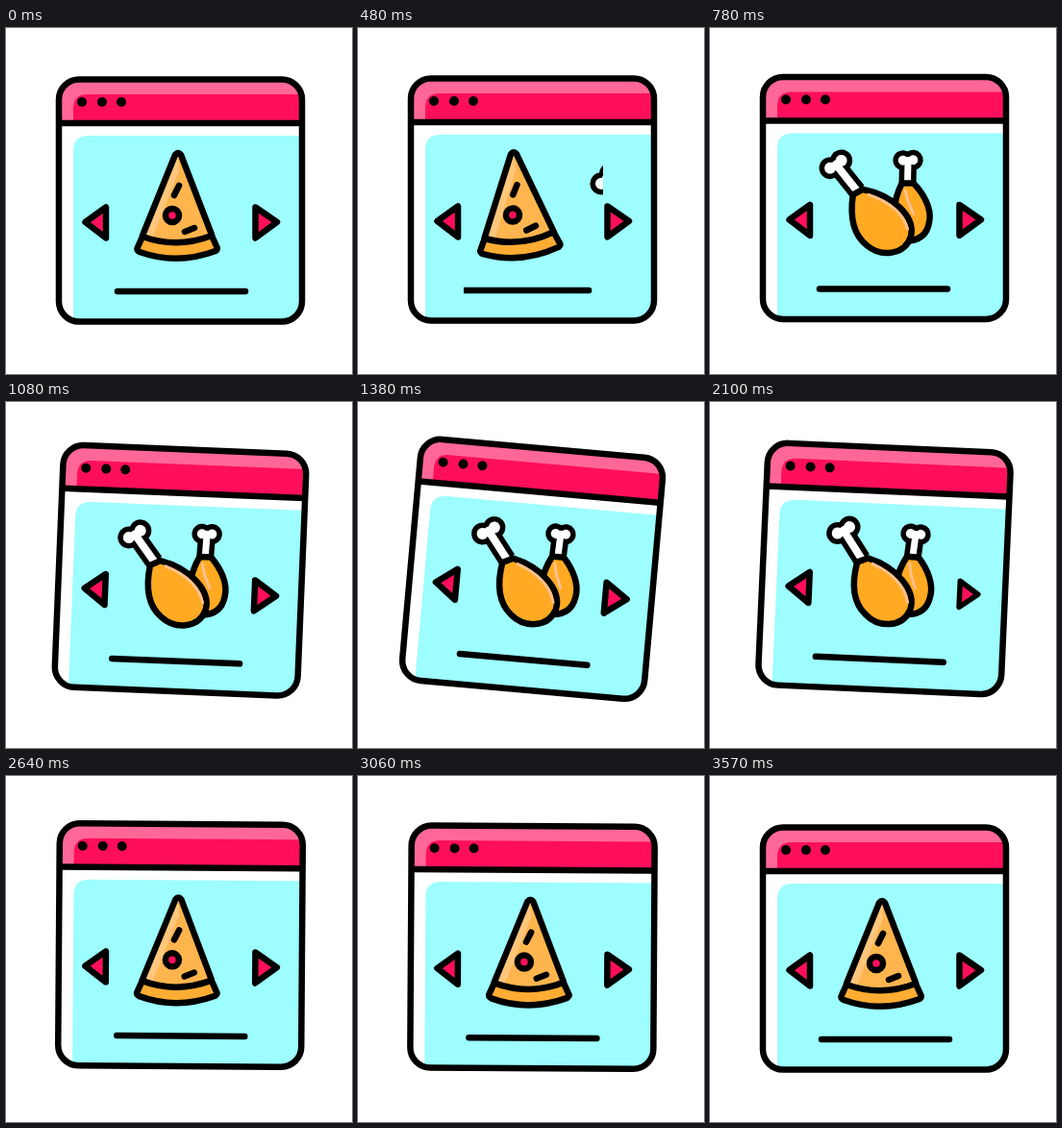
Recreate the animation shown at these times as an HTML page. Size 360 px wide and 360 px high, loop 3.6 s.

```html
<!DOCTYPE html>
<html lang="en">
<head>
<meta charset="utf-8">
<title>Food carousel</title>
<style>
  html, body { margin: 0; width: 100%; height: 100%; overflow: hidden; background: #fff; }
  svg { display: block; width: 100vw; height: 100vh; }
  .ink { stroke: #000; stroke-width: 6.5; stroke-linecap: round; stroke-linejoin: round; }
  .none { fill: none; }
  .red { fill: #ff0f5b; }
  .meat { fill: #ffaa22; }
  .shine { fill: none; stroke: #ffc08c; stroke-width: 3; stroke-linecap: round; }
</style>
</head>
<body>
<svg viewBox="0 0 360 360">
  <defs>
    <clipPath id="frame"><rect x="55" y="53.5" width="253" height="252" rx="21"/></clipPath>
    <clipPath id="view"><rect x="110" y="104" width="145" height="196"/></clipPath>
  </defs>
  <g id="win">
    <g clip-path="url(#frame)">
      <rect x="52" y="50" width="260" height="260" fill="#fff"/>
      <rect x="52" y="50" width="260" height="49" fill="#ff6798"/>
      <path class="red" d="M70 99 V84 Q70 69 85 69 H312 V99 Z"/>
      <path d="M70 310 V128 Q70 112 86 112 H312 V310 Z" fill="#9dfdff"/>
    </g>
    <rect class="ink none" x="55" y="53.5" width="253" height="252" rx="21"/>
    <path class="ink" d="M56 99 H307"/>
    <circle cx="79" cy="77" r="5"/><circle cx="100" cy="77" r="5"/><circle cx="120" cy="77" r="5"/>

    <g clip-path="url(#view)">
      <g id="slideA">
        <path class="ink" d="M116 274 H249"/>
        <g id="pizza">
          <path d="M179 130 L142 217 Q178 230 214 216 Z" fill="#ffb54e"/>
          <path d="M179 130 L142 217 L152 220 L180 148 Z" fill="#ffc67c"/>
          <path class="ink none" d="M142 216 L176 132 Q179 128 182 132 L214 215"/>
          <path class="ink" d="M142 217 Q178 230 214 216 L219 227 Q221 230 218 232 Q178 247 139 233 Q135 231 137 228 Z" fill="#ffac33"/>
          <circle class="ink red" cx="173" cy="195" r="7"/>
          <path class="ink" d="M180 164 L175 174 M186 212 L196 208"/>
        </g>
      </g>
      <g id="slideB">
        <path class="ink" d="M114 274 H247"/>
        <g id="legs">
          <g transform="translate(181.5 180) rotate(4.66) translate(-181 -173)">
            <g id="bone2"></g>
            <path class="ink meat" d="M199 156 L211 155 C222 165 232 180 230 194 C229 208 220 215 205 216 C187 205 192 172 199 156 Z"/>
            <path class="shine" d="M203 163 L206 173 L213 187"/>
            <g id="bone1"></g>
            <path class="ink meat" d="M149 171 C147 195 152 213 167 223 C182 234 207 231 212 210 C215 189 190 169 159 165 Z"/>
            <path class="shine" d="M165 170 Q199 179 208 203"/>
          </g>
        </g>
      </g>
    </g>

    <path class="ink red" d="M82.5 202 L104 186.5 V218.5 Z"/>
    <path class="ink red" id="next" d="M259.5 186.5 L282 202 L259.5 218.5 Z"/>
  </g>
</svg>
<script>
const LOOP = 3600, HALF = LOOP / 2, STEP = 155;
const $ = id => document.getElementById(id);
const put = (id, value) => $(id).setAttribute('transform', value);

// Keys are [time, value] pairs joined by sine easing.
// The window swings out once, then settles like a pendulum while it floats up and down.
const TILT = [[880, 0], [1330, 5.6], [1690, -4.7], [2080, 2.6], [2400, -2.5], [2770, 1.5], [3200, 0]];
const RISE = [[0, 0], [HALF, -6.5], [LOOP, 0]];
const PRESS = [[150, 1], [300, 0.85], [440, 1]];
const LEAVE = [[150, 0], [310, 3], [620, -10]];
const ENTER = [[360, 0], [480, -14], [840, 0]];

function at(keys, t) {
  if (t <= keys[0][0]) return keys[0][1];
  for (let i = 1; i < keys.length; i++) {
    const [t0, a] = keys[i - 1], [t1, b] = keys[i];
    if (t < t1) return a + (b - a) * (1 - Math.cos(Math.PI * (t - t0) / (t1 - t0))) / 2;
  }
  return keys[keys.length - 1][1];
}

function slideEase(t) {
  const p = Math.min(1, Math.max(0, (t - 420) / 360));
  return p < 0.5 ? 2 * p * p : 1 - 2 * (1 - p) ** 2;
}

// Two knobs and a shaft: a dark silhouette with a white core.
function bone(id, [ax, ay], [bx, by], [ex, ey], r, w) {
  const layer = (color, inset) => `
    <g fill="${color}" stroke="${color}">
      <circle cx="${ax}" cy="${ay}" r="${r - inset}" stroke="none"/>
      <circle cx="${bx}" cy="${by}" r="${r - inset}" stroke="none"/>
      <path d="M${(ax + bx) / 2} ${(ay + by) / 2} L${ex} ${ey}" stroke-width="${w - 2 * inset}" stroke-linecap="${inset ? 'round' : 'butt'}"/>
    </g>`;
  $(id).innerHTML = layer('#000', 0) + layer('#fff', 5.5);
}

function draw(t) {
  const u = t % HALF, p = slideEase(u);
  const [outSlide, outItem, inSlide, inItem] = t < HALF
    ? ['slideA', 'pizza', 'slideB', 'legs']
    : ['slideB', 'legs', 'slideA', 'pizza'];
  put('win', `translate(0 ${at(RISE, t)}) rotate(${at(TILT, t)} 181.5 180)`);
  put(outSlide, `translate(${-STEP * p} 0)`);
  put(inSlide, `translate(${STEP * (1 - p)} 0)`);
  put(outItem, `rotate(${at(LEAVE, u)} 180 235)`);
  put(inItem, `rotate(${at(ENTER, u)} 180 235)`);
  put('next', `translate(268 202) scale(${at(PRESS, u)}) translate(-268 -202)`);
}

bone('bone1', [123.5, 145], [134.5, 136.5], [153, 167], 11.5, 19);
bone('bone2', [198.5, 132], [209, 131], [205, 160], 10.5, 18);

const start = performance.now();
function tick() {
  draw((performance.now() - start) % LOOP);
  requestAnimationFrame(tick);
}
tick();
</script>
</body>
</html>
```
